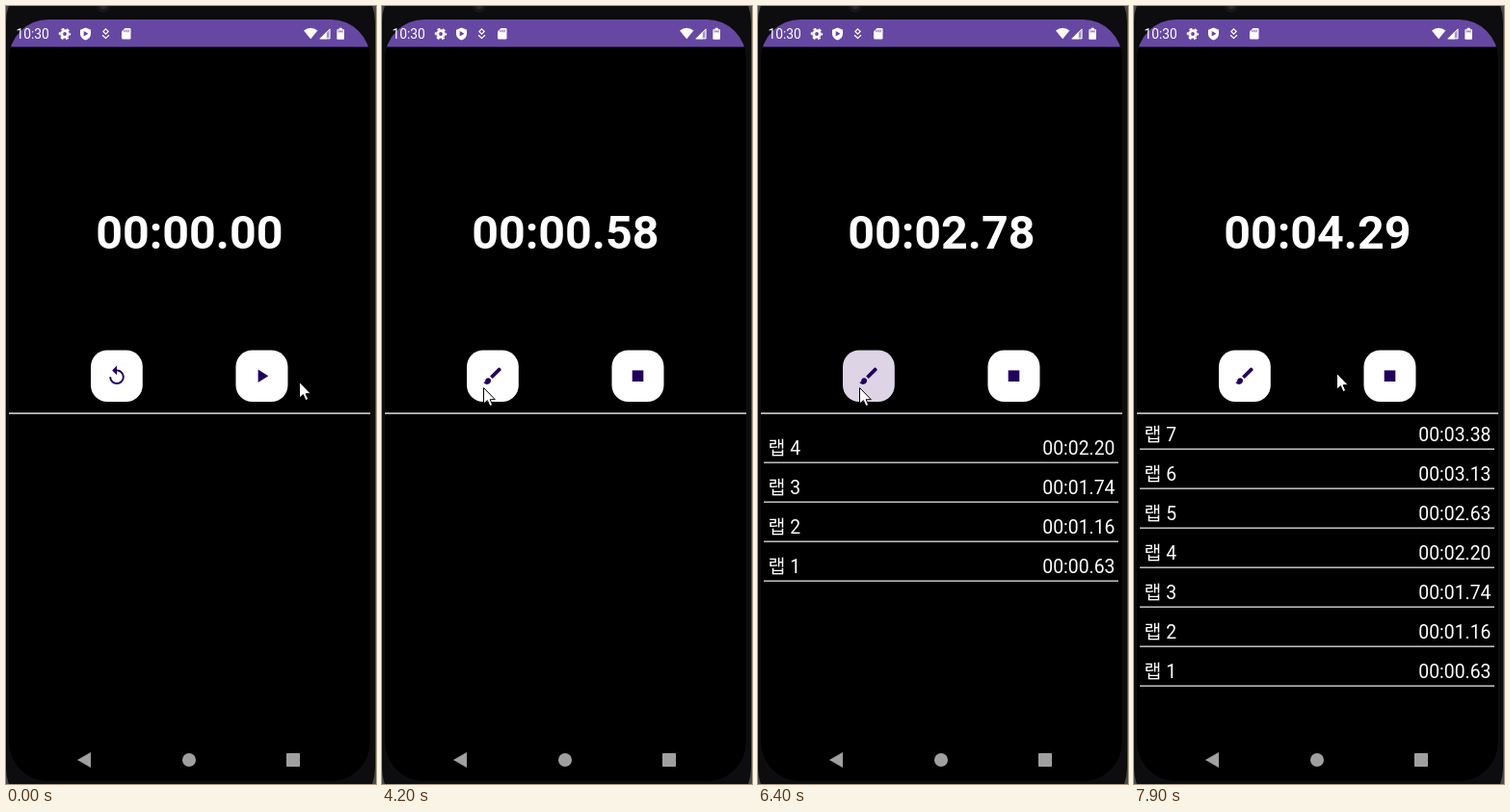
An HTML page that plays this animation: 384x808 px, repeating every 8 s.

```html
<!DOCTYPE html>
<html lang="ko">
<head>
<meta charset="utf-8">
<title>Stopwatch</title>
<style>
html, body { margin: 0; width: 100%; height: 100%; overflow: hidden; background: #000; }
svg { display: block; width: 384px; height: 808px; }
text { font-family: Roboto, "Noto Sans CJK KR", "Noto Sans CJK", sans-serif; fill: #fff; }
.row text { font-size: 19.4px; }
.icon { fill: #21005d; }
</style>
</head>
<body>
<svg viewBox="0 0 384 808">
  <defs>
    <clipPath id="screen"><rect x="3" y="14" width="375" height="791" rx="41"/></clipPath>
    <clipPath id="list"><rect x="3" y="424" width="375" height="336"/></clipPath>
  </defs>

  <!-- phone body -->
  <rect width="384" height="808" fill="#4a4a4d"/>
  <rect y="-30" width="383" height="868" rx="46" fill="#0d0c0f"/>
  <circle cx="101" cy="0" r="7" fill="#17161a"/>
  <circle cx="101" cy="0" r="3.5" fill="#29282d"/>
  <g clip-path="url(#screen)">
    <rect width="384" height="808" fill="#000"/>
    <rect y="14" width="384" height="28.5" fill="#6648a3"/>
  </g>

  <!-- status bar -->
  <text x="10.5" y="34" font-size="13.8">10:30</text>
  <g fill="#fff">
    <circle cx="61" cy="29" r="3.3" fill="none" stroke="#fff" stroke-width="2.8"/>
    <circle cx="61" cy="29" r="5.3" fill="none" stroke="#fff" stroke-width="1.8" stroke-dasharray="2.9 2.65" stroke-dashoffset="1.45"/>
    <path d="M82.5 22.5l5.5 2.3v4c0 3.2-2.3 5.8-5.5 6.8-3.200-1-5.500-3.600-5.500-6.800v-4z"/>
    <path d="M80.700 26v5.600l4.800-2.800z" fill="#6648a3"/>
    <path d="M103.500 23.800l2.700 2.700-2.700 2.700-2.700-2.700zM100 30.300l3.500 3.200 3.500-3.200" fill="none" stroke="#fff" stroke-width="1.2"/>
    <path d="M123.500 23h5q1 0 1 1v9.500q0 1-1 1h-7.500q-1 0-1-1v-7z"/>
    <path d="M122.800 25v2.200M124.900 24.500v2.700M127 24.500v2.700" stroke="#6648a3" stroke-width=".9"/>
    <path d="M309 25.600q7.200-5.600 14.400 0l-7.200 8.700z"/>
    <path d="M336.500 23v11.300h-11.300z" fill-opacity=".4"/>
    <path d="M325.200 34.300l7.600-7.600v7.600z"/>
    <path d="M336 24.200v9.600h-9.600z" fill="none" stroke="#fff"/>
    <path d="M345.600 22.800h3.200v1.400h1.500q.7 0 .7.700v9.200q0 .7-.7.700h-6.200q-.7 0-.7-.7v-9.200q0-.7.7-.7h1.500z"/>
    <path d="M344.600 25.400h5.200v2h-5.200z" fill="#6648a3" fill-opacity=".6"/>
  </g>

  <!-- stopwatch -->
  <text id="clock" x="190.300" y="252" font-size="48.400" font-weight="700" text-anchor="middle">00:00.00</text>
  <rect id="left" x="88" y="357.500" width="53.800" height="53.500" rx="17"/>
  <rect id="right" x="238.500" y="357.500" width="54" height="53.500" rx="17"/>
  <path id="leftIcon" class="icon" transform="translate(103.400 372.600) scale(.968)"/>
  <path id="rightIcon" class="icon" transform="translate(253.900 372.600) scale(.968)"/>
  <rect x="3" y="422.300" width="375" height="1.500" fill="#dfe3dc"/>
  <g id="laps" clip-path="url(#list)"></g>

  <!-- navigation -->
  <g fill="#a0a0a0">
    <path d="M88 775v16l-14-8z"/>
    <circle cx="190" cy="783" r="7"/>
    <rect x="291" y="776" width="14" height="14" rx=".8"/>
  </g>

  <path id="cursor" d="M0 0v16.600l3.900-3.500 2.600 6 2.700-1.200-2.600-5.700h5.200z" fill="#fff" stroke="#000" stroke-width="1"/>
</svg>

<script>
const LOOP = 8000, STEP = 100;
const $ = id => document.getElementById(id);

const ICON = {
  replay: "M12 5V1L7 6l5 5V7c3.310 0 6 2.690 6 6s-2.690 6-6 6-6-2.690-6-6H4c0 4.420 3.580 8 8 8s8-3.580 8-8-3.580-8-8-8z",
  brush: "M7 14c-1.660 0-3 1.340-3 3 0 1.310-1.160 2-2 2 .920 1.220 2.490 2 4 2 2.210 0 4-1.790 4-4 0-1.660-1.340-3-3-3zm13.710-9.370l-1.340-1.340c-.390-.390-1.020-.390-1.410 0L9 12.250 11.750 15l8.960-8.960c.390-.390.390-1.020 0-1.410z",
  play: "M8 5v14l11-7z",
  stop: "M6 6h12v12H6z"
};

// [time, hundredths]; repeated times are hard changes
const CLOCK = [[0, 0], [530, 0], [1700, 117], [1950, 142], [2700, 142], [2700, 0], [3616, 0],
  [4200, 58], [5600, 196], [6400, 278], [6900, 330], [7900, 429], [8000, 439]];

// [time, x, y]
const POINTER = [[0, 304, 390], [100, 304, 390], [400, 281, 390], [2050, 281, 390],
  [2600, 105, 396], [2750, 105, 396], [3250, 309, 393], [3500, 272, 392], [3650, 272, 392],
  [4050, 105, 396], [7350, 105, 396], [7900, 210, 381], [8000, 218, 381]];

// [hundredths, time the list starts to move]
const LAPS = [[63, 4340], [116, 4870], [174, 5448], [220, 5915], [263, 6344], [313, 6825], [338, 7060]];

const RIGHT_TAPS = [530, 1950, 3616];
const LEFT_TAPS = [2700, ...LAPS.map(([v]) => 3615 + v * 10)];

const clamp = v => Math.max(0, Math.min(1, v));
const smooth = p => p * p * (3 - 2 * p);
const easeOut = p => 1 - (1 - p) ** 2;
const pad = n => String(n).padStart(2, "0");
const format = v => `00:${pad(Math.floor(v / 100))}.${pad(v % 100)}`;

function sample(track, t, col, ease = p => p) {
  let i = track.length - 2;
  while (i > 0 && track[i][0] > t) i--;
  const a = track[i], b = track[i + 1];
  const p = clamp((t - a[0]) / (b[0] - a[0] || 1));
  return a[col] + (b[col] - a[col]) * ease(p);
}

function ripple(taps, t) {
  return Math.max(...taps.map(tap => {
    const d = t - tap;
    return Math.min(clamp((d + 40) / 90), clamp((450 - d) / 290));
  }));
}

function buttonFill(amount) {
  const mix = c => Math.round(255 + (c - 255) * amount);
  return `rgb(${mix(221)},${mix(212)},${mix(230)})`;
}

$("laps").innerHTML = LAPS.map(([v], i) => `<g class="row">
  <text x="10.500" y="452">랩 ${i + 1}</text>
  <text x="370.500" y="452" text-anchor="end">${format(v)}</text>
  <rect x="6" y="459.500" width="368" height="1.300" fill="#e4e4e4"/></g>`).join("");
const rows = [...document.querySelectorAll(".row")];

function draw(t) {
  const running = (t >= 530 && t < 1950) || t >= 3616;
  $("clock").textContent = format(Math.round(sample(CLOCK, t, 1)));
  $("leftIcon").setAttribute("d", running ? ICON.brush : ICON.replay);
  $("rightIcon").setAttribute("d", running ? ICON.stop : ICON.play);
  $("left").setAttribute("fill", buttonFill(ripple(LEFT_TAPS, t)));
  $("right").setAttribute("fill", buttonFill(ripple(RIGHT_TAPS, t)));

  // each newer lap pushes the older ones down, then fades in
  let shift = 0;
  for (let i = rows.length - 1; i >= 0; i--) {
    const age = t - LAPS[i][1];
    rows[i].setAttribute("transform", `translate(0 ${Math.round(shift)})`);
    rows[i].setAttribute("opacity", smooth(clamp((age - (i ? 300 : 100)) / 200)));
    shift += 41 * easeOut(clamp(age / 300));
  }

  const x = Math.round(sample(POINTER, t, 1, smooth));
  const y = Math.round(sample(POINTER, t, 2, smooth));
  $("cursor").setAttribute("transform", `translate(${x + .5} ${y + .5})`);
}

const start = performance.now();
function tick() {
  const t = (performance.now() - start) % LOOP;
  draw(Math.floor(t / STEP) * STEP);
  requestAnimationFrame(tick);
}
tick();
</script>
</body>
</html>
```
